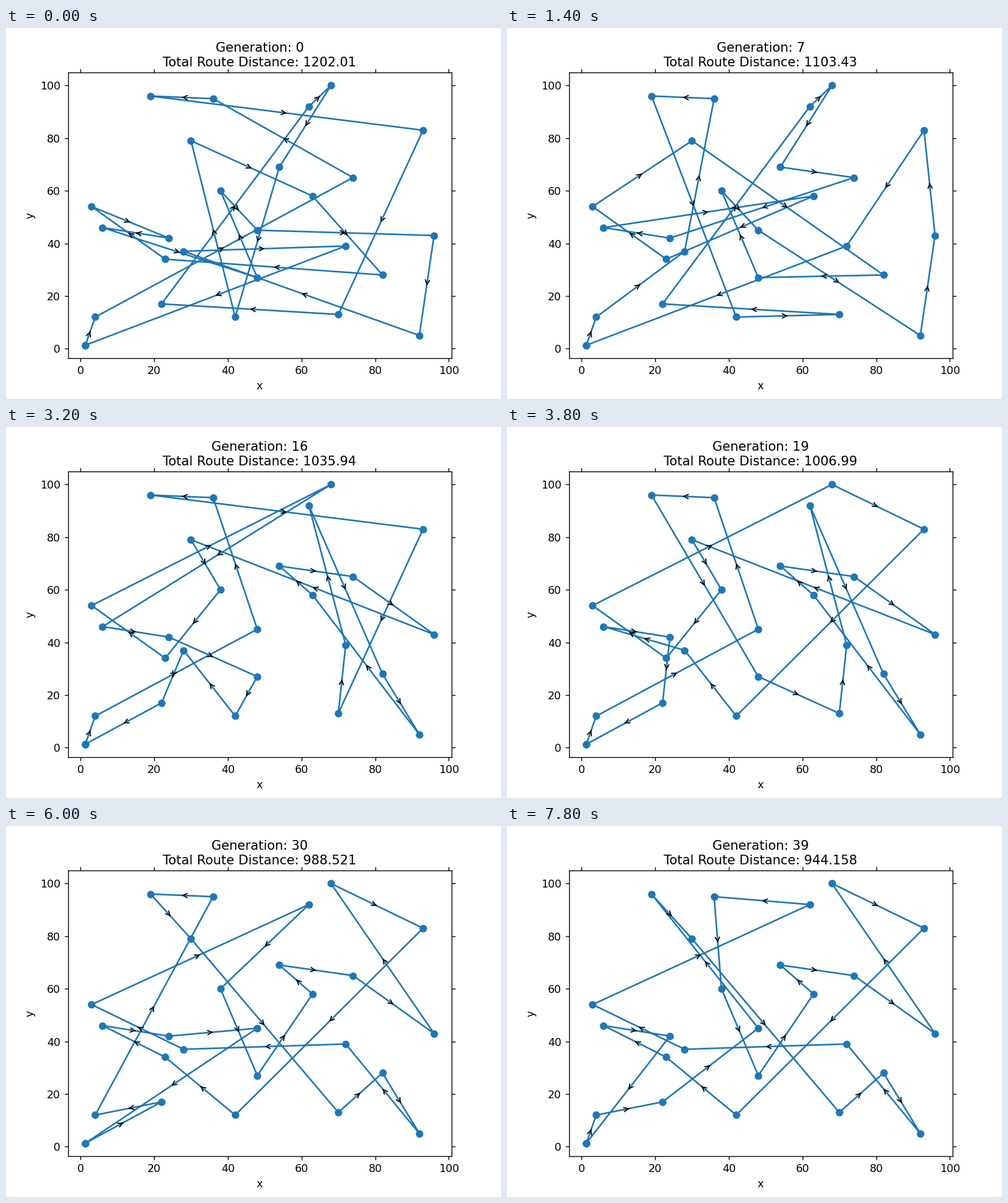
A matplotlib script for the animation above (8000 ms loop, 812 by 609 pixels).

```python
import math
from itertools import combinations

import matplotlib.pyplot as plt
from matplotlib.animation import FuncAnimation
from matplotlib.patches import FancyArrowPatch

GENERATIONS = 40
STEP_MS = 200

# Cities A to Z
POINTS = [
    (1.3, 1.3), (4, 12), (3, 54), (6, 46), (24, 42), (23, 34), (28, 37),
    (22, 17), (19, 96), (36, 95), (30, 79), (38, 60), (48, 45), (48, 27),
    (42, 12), (54, 69), (63, 58), (74, 65), (62, 92), (68, 100), (93, 83),
    (96, 43), (72, 39), (82, 28), (92, 5), (70, 13),
]
CITY = dict(zip("ABCDEFGHIJKLMNOPQRSTUVWXYZ", POINTS))

# Best tour at some generations
TOURS = {
    0: "ABRJIUZHSTPOKQXFCEDNLMVYGW",
    7: "ABGJIOZHSTPREDQFCKXNLMYVUW",
    11: "ABMJIUZWSLPRKDEFQCTNOGVYXH",
    19: "ABMJINZWSXYQPRVKLFCTUOGDEH",
    27: "AHMJIZXYQKGCSLNWPRVTUOFDEB",
    34: "ABHJIKZXYWGCSLNQPRVTUOFDEM",
    39: "ABHMIKZXYWGCSJLNQPRVTUOFDE",
}


def legs(tour):
    return list(zip(tour, tour[1:] + tour[0]))


def length(tour):
    return sum(math.dist(CITY[a], CITY[b]) for a, b in legs(tour))


def crossover(p, q, i, j):
    """Keep q[i:j] in place and fill the rest in the order of p."""
    part = q[i:j]
    rest = "".join(c for c in p if c not in part)
    return rest[:i] + part + rest[i:]


def children(p, q):
    """Crossovers of two tours with their length and count of new legs."""
    known = set(legs(p)) | set(legs(q))
    tours = {crossover(a, b, i, j)
             for a, b in ((p, q), (q, p))
             for i, j in combinations(range(1, len(p) + 1), 2)}
    return [(t, length(t), len(set(legs(t)) - known)) for t in sorted(tours)]


def evolve():
    best = dict(TOURS)
    marks = sorted(TOURS)
    for g0, g1 in zip(marks, marks[1:]):
        p, q = TOURS[g0], TOURS[g1]
        brood = children(p, q)
        lp, lq = length(p), length(q)
        for g in range(g0 + 1, g1):
            goal = lp + (lq - lp) * (g - g0) / (g1 - g0)
            best[g] = min(brood, key=lambda c: abs(c[1] - goal) + 4 * c[2])[0]
    return best


best = evolve()

fig, ax = plt.subplots(figsize=(6.4, 4.8), dpi=126.875)
ax.tick_params(top=True, right=True)
ax.set_xlabel("x")
ax.set_ylabel("y")
line, = ax.plot(*zip(*POINTS), "o-", color="#1f77b4")
ax.set_xlim(ax.get_xlim())
ax.set_ylim(ax.get_ylim())

arrows = [FancyArrowPatch((0, 0), (1, 1), arrowstyle="->", mutation_scale=10,
                          shrinkA=0, shrinkB=0, color="black", zorder=3)
          for _ in POINTS]
for arrow in arrows:
    ax.add_artist(arrow)


def along(a, b, t):
    return a[0] + (b[0] - a[0]) * t, a[1] + (b[1] - a[1]) * t


def draw(g):
    tour = best[g]
    line.set_data(*zip(*(CITY[c] for c in tour + tour[0])))
    for arrow, (a, b) in zip(arrows, legs(tour)):
        a, b = CITY[a], CITY[b]
        arrow.set_positions(along(a, b, 0.49), along(a, b, 0.5))
    ax.set_title(f"Generation: {g}\nTotal Route Distance: {length(tour):.6g}")
    return [line, *arrows]


anim = FuncAnimation(fig, draw, frames=GENERATIONS, init_func=lambda: draw(0),
                     interval=STEP_MS, repeat=True, repeat_delay=0)
plt.show()
```
